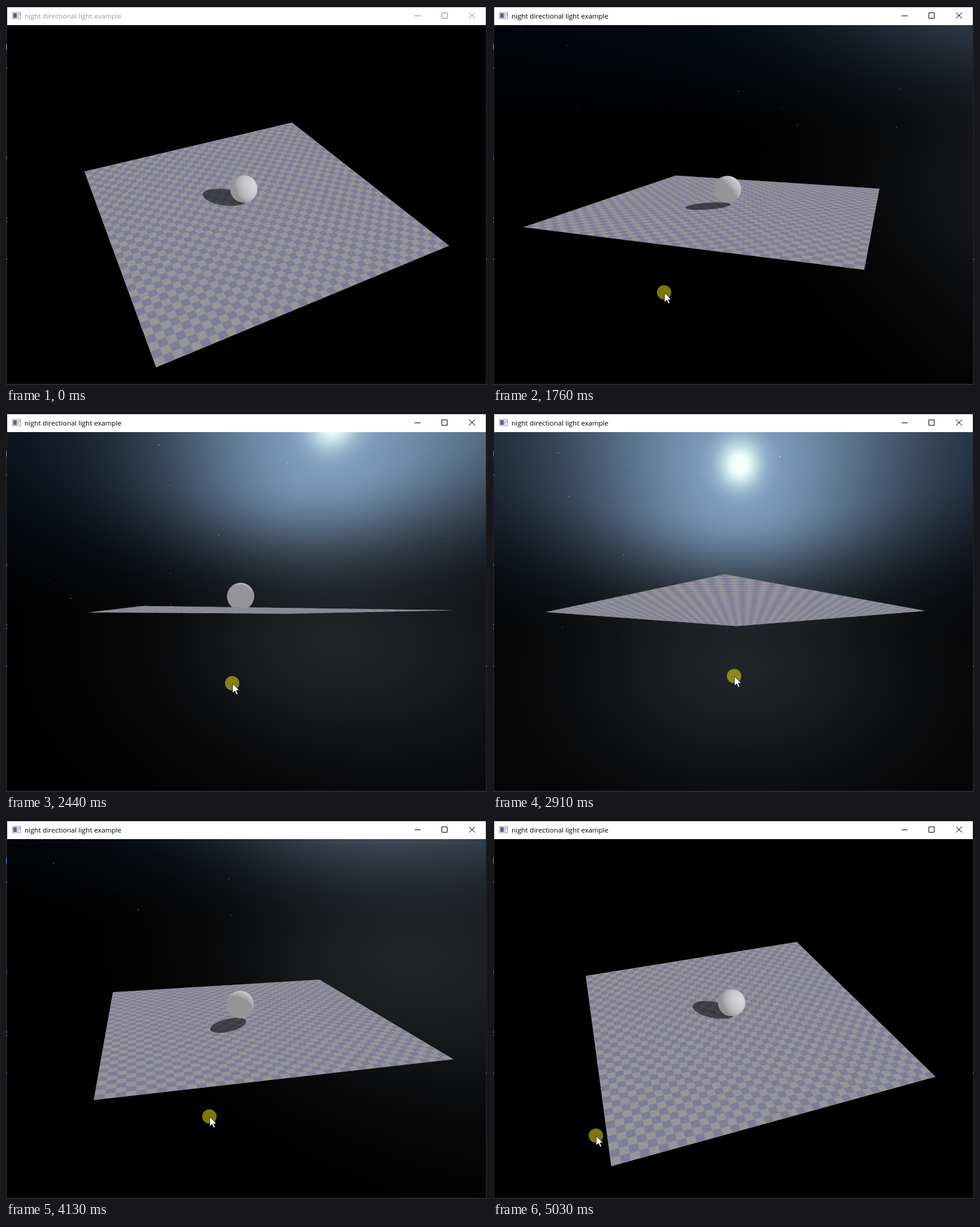
These frames come from a looping animation (804 px wide and 634 px high, 5.1 s). An HTML page with a canvas:

```html
<!DOCTYPE html>
<html lang="en">
<head>
<meta charset="utf-8">
<title>night directional light example</title>
<style>
html, body { margin: 0; width: 100%; height: 100%; overflow: hidden; background: #000; }
canvas { display: block; }
</style>
</head>
<body>
<canvas id="stage" width="804" height="634"></canvas>
<script>
const LOOP = 5100, CX = 402, CY = 332;
const FOCAL = 724.26, SKY_FOCAL = 442, DIST = 3.225;
const CELLS = 40, RAD = Math.PI / 180;
const SUN_EL = 35.4 * RAD;
const BALL = { x: -0.0327, z: 0.0351, h: 0.111, r: 0.101 };
const ACTIVATE = 1010;

// time, pointer x, pointer y, yaw, pitch
const KEYS = [
  [0, 560, 660, 18.57, 37.3],
  [270, 560, 660, 18.57, 37.3],
  [860, 202, 527, 18.57, 37.3],
  [1010, 202, 527, 18.57, 37.3],
  [1150, 205, 524, 17.05, 35.85],
  [1760, 286, 479, -24.9, 13.5],
  [2440, 378, 452, -71.5, -1],
  [2980, 404, 440, -89, -6.5],
  [3510, 404, 440, -89, -6.5],
  [3650, 398, 460, -87, 0],
  [4130, 340, 496, -58.8, 18.9],
  [5030, 172, 528, 26, 36.2],
  [5100, 166, 529, 27.8, 36.5]
];

const ctx = document.getElementById('stage').getContext('2d');

function buffer(w, h) {
  const canvas = document.createElement('canvas');
  canvas.width = w;
  canvas.height = h;
  const c = canvas.getContext('2d');
  return { canvas, c, w, h, img: c.createImageData(w, h) };
}
const sky = buffer(200, 150);
const ballBuf = buffer(64, 64);

function random(seed) {
  return () => {
    seed = (seed * 1664525 + 1013904223) >>> 0;
    return seed / 4294967296;
  };
}
const rnd = random(77);
const stars = Array.from({ length: 270 }, () => {
  const h = rnd(), a = rnd() * 2 * Math.PI, r = Math.sqrt(1 - h * h);
  return { x: r * Math.cos(a), z: r * Math.sin(a), h, light: 0.15 + 0.85 * rnd() ** 2, wide: rnd() < 0.1 };
});

const clamp = (v, a, b) => Math.min(b, Math.max(a, v));
const smooth = (a, b, v) => {
  const k = clamp((v - a) / (b - a), 0, 1);
  return k * k * (3 - 2 * k);
};

// Cubic through the keys, flat at local extremes and rests
function slope(i, k) {
  if (i === 0 || i === KEYS.length - 1) return 0;
  const [p, c, n] = [KEYS[i - 1], KEYS[i], KEYS[i + 1]];
  const a = (c[k] - p[k]) / (c[0] - p[0]), b = (n[k] - c[k]) / (n[0] - c[0]);
  return a * b <= 0 ? 0 : 2 * a * b / (a + b);
}
function pose(t) {
  let i = 0;
  while (i < KEYS.length - 2 && t >= KEYS[i + 1][0]) i++;
  const A = KEYS[i], B = KEYS[i + 1], d = B[0] - A[0], s = (t - A[0]) / d;
  const at = k => {
    const s2 = s * s, s3 = s2 * s;
    return (2 * s3 - 3 * s2 + 1) * A[k] + (s3 - 2 * s2 + s) * d * slope(i, k) +
      (3 * s2 - 2 * s3) * B[k] + (s3 - s2) * d * slope(i + 1, k);
  };
  return { mx: at(1), my: at(2), yaw: at(3) * RAD, pitch: at(4) * RAD };
}

function camera({ yaw, pitch }) {
  const c = Math.cos(pitch), s = Math.sin(pitch), cy = Math.cos(yaw), sy = Math.sin(yaw);
  const turn = (x, z) => [x * cy + z * sy, z * cy - x * sy];
  const project = (x, z, h = 0) => {
    const [u, v] = turn(x, z);
    const depth = DIST + v * c - h * s;
    return [CX + FOCAL * u / depth, CY - FOCAL * (v * s + h * c) / depth, depth];
  };
  const [su, sv] = turn(Math.cos(SUN_EL), 0);
  return { c, s, pitch, turn, project, sun: [su, Math.sin(SUN_EL), sv] };
}

function drawSky(cam) {
  const { c, s, sun } = cam, px = sky.img.data;
  const sunAz = Math.atan2(sun[0], sun[2]);
  let k = 0;
  for (let j = 0; j < sky.h; j++) {
    const y = 300 - (j + 0.5) * 4;
    const up = y * c - SKY_FOCAL * s, fwd = SKY_FOCAL * c + y * s;
    for (let i = 0; i < sky.w; i++) {
      const x = (i + 0.5) * 4 - 400;
      const len = Math.hypot(x, up, fwd);
      const el = Math.asin(up / len) / RAD;
      const dot = (x * sun[0] + up * sun[1] + fwd * sun[2]) / len;
      const gap = Math.acos(clamp(dot, -1, 1)) / RAD;
      let az = Math.abs(Math.atan2(x, fwd) - sunAz);
      az = Math.min(az, 2 * Math.PI - az) / RAD;
      const ground = 36 * Math.exp(-((az / 33) ** 2) - ((el + 5) / 23) ** 2);
      const air = smooth(-1, 27, el);
      const glow = 152 * Math.exp(-((gap / 33) ** 2));
      const halo = Math.exp(-((gap / 3.9) ** 2));
      px[k++] = air * (2 + glow * 0.82 + halo * 125) + ground * 0.92;
      px[k++] = air * (7 + glow + halo * 112) + ground;
      px[k++] = air * (16 + glow * 1.16 + halo * 66) + ground * 1.1;
      px[k++] = 255;
    }
  }
  sky.c.putImageData(sky.img, 0, 0);
  ctx.drawImage(sky.canvas, 2, 32, 800, 600);
}

function drawStars(cam) {
  const { c, s } = cam;
  ctx.fillStyle = '#fff';
  for (const p of stars) {
    const [u, v] = cam.turn(p.x, p.z);
    const depth = v * c - p.h * s;
    if (depth < 0.1) continue;
    const x = CX + SKY_FOCAL * u / depth, y = CY - SKY_FOCAL * (v * s + p.h * c) / depth;
    if (x < 2 || x > 801 || y < 32 || y > 631) continue;
    ctx.globalAlpha = p.light;
    ctx.fillRect(Math.round(x), Math.round(y), p.wide ? 2 : 1, 1);
  }
  ctx.globalAlpha = 1;
}

function trace(points) {
  points.forEach((p, i) => i ? ctx.lineTo(p[0], p[1]) : ctx.moveTo(p[0], p[1]));
  ctx.closePath();
}
function fillShape(points, color) {
  ctx.beginPath();
  trace(points);
  ctx.fillStyle = color;
  ctx.fill();
}

function drawFloor(cam) {
  const at = (i, j) => {
    const p = i / CELLS, q = j / CELLS;
    return cam.project(Math.SQRT2 * (p - q), Math.SQRT2 * (p + q - 1));
  };
  fillShape([at(0, 0), at(CELLS, 0), at(CELLS, CELLS), at(0, CELLS)], '#969598');
  ctx.beginPath();
  for (let i = 0; i < CELLS; i++)
    for (let j = 1 - i % 2; j < CELLS; j += 2)
      trace([at(i, j), at(i + 1, j), at(i + 1, j + 1), at(i, j + 1)]);
  ctx.fillStyle = '#7f7e98';
  ctx.fill();
}

function drawShadow(cam) {
  const mid = BALL.x - BALL.h / Math.tan(SUN_EL), long = BALL.r / Math.sin(SUN_EL);
  const ring = Array.from({ length: 48 }, (_, i) => {
    const a = i / 24 * Math.PI;
    return cam.project(mid + long * Math.cos(a), BALL.z + BALL.r * Math.sin(a));
  });
  fillShape(ring, 'rgba(10,11,18,.59)');
}

function drawBall(cam) {
  const [x, y, depth] = cam.project(BALL.x, BALL.z, BALL.h);
  const r = FOCAL * BALL.r / depth;
  const [su, sh, sv] = cam.sun;
  const lx = su, ly = sv * cam.s + sh * cam.c, lz = sh * cam.s - sv * cam.c;
  const px = ballBuf.img.data, n = ballBuf.w;
  for (let j = 0, k = 0; j < n; j++) {
    for (let i = 0; i < n; i++) {
      const nx = (i + 0.5) * 2 / n - 1, ny = 1 - (j + 0.5) * 2 / n;
      const nz = Math.sqrt(Math.max(0, 1 - nx * nx - ny * ny));
      const lit = Math.max(0, nx * lx + ny * ly + nz * lz) ** 0.65;
      px[k++] = 150 + 62 * lit;
      px[k++] = 148 + 65 * lit;
      px[k++] = 152 + 66 * lit;
      px[k++] = 255;
    }
  }
  ballBuf.c.putImageData(ballBuf.img, 0, 0);
  ctx.save();
  ctx.beginPath();
  ctx.arc(x, y, r, 0, 7);
  ctx.clip();
  ctx.drawImage(ballBuf.canvas, x - r, y - r, 2 * r, 2 * r);
  ctx.restore();
}

function rect(x, y, w, h, color) {
  ctx.fillStyle = color;
  ctx.fillRect(x, y, w, h);
}

function drawWindow(active) {
  rect(0, 0, 804, 2, '#1c1c1e');
  rect(0, 0, 2, 634, '#1e1e20');
  rect(802, 0, 2, 634, '#1e1e20');
  rect(0, 632, 804, 2, '#2a2829');
  rect(0, 63, 1, 10, active ? '#5a8fd0' : '#8b93a3');
  for (const y of [103, 252, 255, 354, 360, 423]) rect(0, y, 2, 1, active ? '#5f7c9c' : '#85878a');
  rect(802, 423, 2, 1, '#77777a');
  rect(2, 2, 800, 30, '#fff');

  rect(10, 10, 15, 12, '#a9adb5');
  rect(11, 11, 13, 10, '#eef0f4');
  rect(12, 12, 6, 8, '#5c6580');
  rect(19, 12, 2, 8, '#b9bdc8');
  rect(22, 12, 2, 4, '#b9bdc8');

  ctx.fillStyle = active ? '#000' : '#999';
  ctx.font = '11.5px "Open Sans", "Noto Sans", sans-serif';
  ctx.textBaseline = 'alphabetic';
  ctx.fillText('night directional light example', 31, 21);
  ctx.strokeStyle = active ? '#000' : '#8a8a8e';
  ctx.lineWidth = 1;
  ctx.beginPath();
  ctx.moveTo(683, 16.5);
  ctx.lineTo(693, 16.5);
  ctx.rect(728.5, 11.5, 9, 9);
  ctx.moveTo(774, 11);
  ctx.lineTo(784, 21);
  ctx.moveTo(784, 11);
  ctx.lineTo(774, 21);
  ctx.stroke();
}

function drawPointer(x, y) {
  x = Math.round(x);
  y = Math.round(y);
  ctx.beginPath();
  ctx.arc(x, y, 12, 0, 7);
  ctx.fillStyle = 'rgba(250,240,12,.5)';
  ctx.fill();
  const arrow = [[0, 0], [0, 16], [4, 12.5], [6.5, 18.5], [9, 17.5], [6.5, 11.5], [11.5, 11.5]]
    .map(p => [x + 0.5 + p[0], y + 0.5 + p[1]]);
  fillShape(arrow, '#fff');
  ctx.strokeStyle = 'rgba(0,0,0,.75)';
  ctx.lineWidth = 1;
  ctx.stroke();
}

function draw(t) {
  const now = pose(t), cam = camera(now);
  drawSky(cam);
  drawStars(cam);
  if (cam.pitch > 0) {
    drawFloor(cam);
    drawShadow(cam);
    drawBall(cam);
  } else {
    drawBall(cam);
    if (cam.pitch < 0) drawFloor(cam);
  }
  drawWindow(t >= ACTIVATE);
  if (t >= 270) drawPointer(now.mx, now.my);
}

const start = performance.now();
function tick() {
  draw((performance.now() - start) % LOOP);
  requestAnimationFrame(tick);
}
tick();
</script>
</body>
</html>
```
